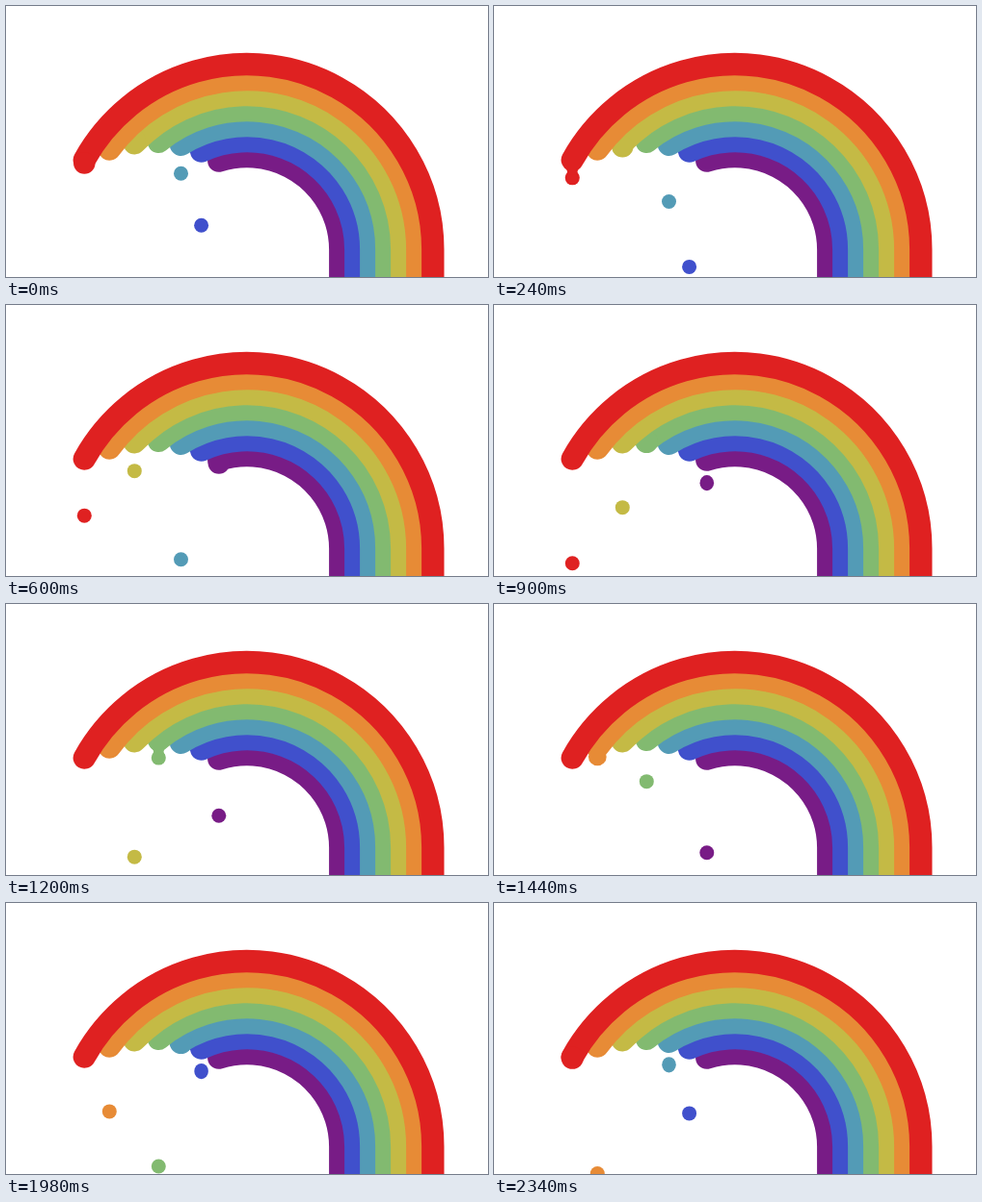
These frames come from a looping animation (500x282 px, 2.4 s). An HTML page with a canvas:

```html
<!DOCTYPE html>
<html lang="en">
<head>
<meta charset="utf-8">
<title>Dripping rainbow</title>
<style>
  html, body { margin: 0; height: 100%; overflow: hidden; background: #fff; }
  canvas { display: block; }
</style>
</head>
<body>
<canvas id="stage" width="500" height="282"></canvas>
<script>
const ctx = document.getElementById('stage').getContext('2d');
const LOOP = 2400, STEP = 60;
const CX = 250, CY = 253.4, OUTER = 192.8, SPACING = 16, WIDTH = 23.4;
const CAP = WIDTH / 2, DROP = 7.5;
const LEAD = 9.6; // steps from the start of a drip until it breaks off

// Outermost first: colour, x of the dripping end, time the drop breaks off
const bands = [
  ['#df2121', 81.3, 300],
  ['#e78b36', 107.3, 1620],
  ['#c4ba45', 133.3, 540],
  ['#82ba70', 158.3, 1260],
  ['#539bb6', 181.5, 2340],
  ['#4050cc', 202.6, 1980],
  ['#781c86', 220.8, 900],
].map(([color, x, release], i) => {
  const radius = OUTER - i * SPACING;
  const y = CY - Math.sqrt(radius ** 2 - (x - CX) ** 2);
  return { color, x, y, radius, release };
});

function drawBand({ color, x, y, radius }) {
  ctx.strokeStyle = color;
  ctx.lineWidth = WIDTH;
  ctx.lineCap = 'round';
  ctx.beginPath();
  ctx.arc(CX, CY, radius, Math.atan2(y - CY, x - CX), 0);
  ctx.lineTo(CX + radius, 310);
  ctx.stroke();
}

function drawNeck(x, y, dropY, r, pinch) {
  const midY = (y + 8 + dropY - 3) / 2;
  ctx.beginPath();
  ctx.moveTo(x - 8.5, y + 8);
  ctx.quadraticCurveTo(x - pinch, midY, x - r * 0.88, dropY - 3);
  ctx.lineTo(x + r * 0.88, dropY - 3);
  ctx.quadraticCurveTo(x + pinch, midY, x + 8.5, y + 8);
  ctx.fill();
}

function drawDrop({ color, x, y, release }, time) {
  const age = ((time - release + LEAD * STEP + LOOP) % LOOP) / STEP;
  const n = age - LEAD; // steps since release, negative while attached
  const dropY = y - 2.7 + 0.29 * age ** 2;
  const r = Math.min(CAP, Math.max(DROP, 6.6 - 0.93 * n));
  const stretch = Math.max(0, 0.6 * (1 - Math.abs(n)));
  ctx.fillStyle = color;
  ctx.beginPath();
  ctx.ellipse(x, dropY, r - stretch / 3, r + stretch, 0, 0, 2 * Math.PI);
  ctx.fill();
  if (n < -0.01 && n > -5) drawNeck(x, y, dropY, r, Math.min(r, -3 * n));
}

function draw(now) {
  const time = Math.floor((now + 1) / STEP) * STEP % LOOP;
  ctx.fillStyle = '#fff';
  ctx.fillRect(0, 0, 500, 282);
  for (const band of [...bands].reverse()) {
    drawBand(band);
    drawDrop(band, time);
  }
  requestAnimationFrame(draw);
}

draw(0);
</script>
</body>
</html>
```
